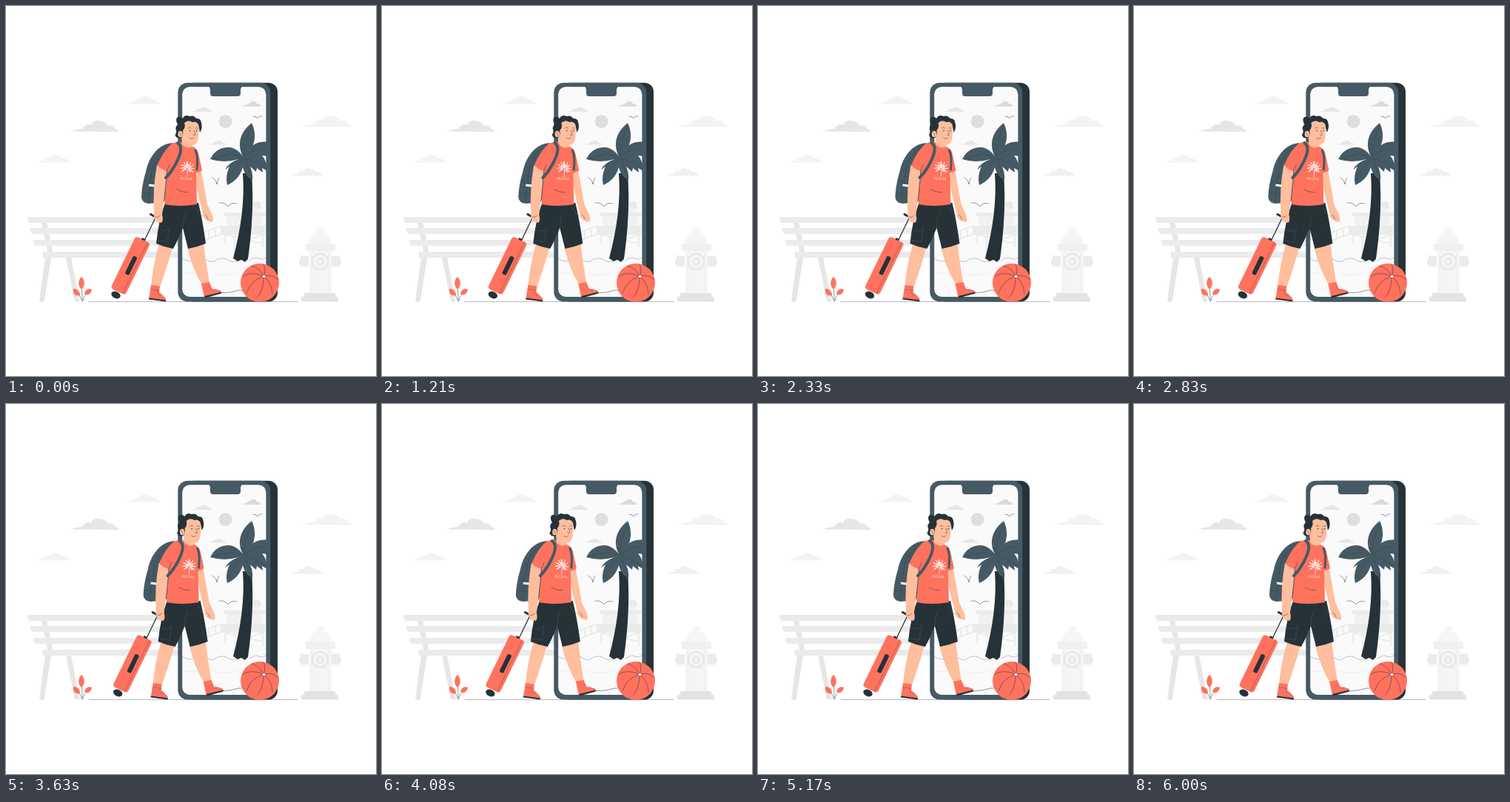
These frames come from a looping animation (500 px wide and 500 px high, 6.04 s). An HTML page:

```html
<!DOCTYPE html>
<html lang="en">
<head>
<meta charset="utf-8">
<title>Traveller</title>
<style>
html, body { margin: 0; width: 100%; height: 100%; overflow: hidden; background: #fff; }
svg { display: block; width: 100vw; height: 100vh; }
.red { fill: #ff725e; }
.dark { fill: #263238; }
.slate { fill: #455a64; }
.skin { fill: #ffbe9d; }
.line, .vein { fill: none; stroke: #263238; stroke-linecap: round; stroke-linejoin: round; }
.line { stroke-width: .5; }
.vein { stroke-width: .4; opacity: .7; }
</style>
</head>
<body>
<svg viewBox="0 0 500 500">
  <defs>
    <path id="cloud" d="M0 15.5Q5 12 15 12Q18 5 26 7Q30 0 38 2Q46 2 49 8Q58 7 59 12Q64 13 64 16Z"/>
    <clipPath id="screen"><rect x="238" y="109" width="116" height="284" rx="11"/></clipPath>
  </defs>

  <g id="clouds"></g>

  <g id="bench" fill="#e6e6e6">
    <path d="M47 288L54 288L64 336L57 336Z"/>
    <path d="M53 340H61L51.500 399.500H45ZM81 340H88L99.500 399.500H93Z"/>
    <path fill="#ebebeb" d="M28 285H236V293H31ZM32 300H236V308H35ZM36 316H236V324H39ZM49 332H236V340H50Z"/>
  </g>

  <g id="hydrant" fill="#f5f5f5">
    <path d="M419 307V303Q419 300 424.500 300Q430 300 430 303V307Q439 312 440 321H409Q410 312 419 307Z"/>
    <rect x="405" y="321" width="40" height="10" rx="2" fill="#f0f0f0"/>
    <rect x="410" y="331" width="30" height="58"/>
    <path fill="#ebebeb" d="M409 338H399V335H398V354H399V352H409ZM440 338H450V335H451V354H450V352H440ZM396 342H398V349H396ZM451 342H453V349H451Z"/>
    <path fill="#e3e3e3" d="M403 388H445V393H449V399.500H399V393H403Z"/>
    <path d="M413 333V387M436 333V387" stroke="#ebebeb" stroke-width=".7"/>
    <circle cx="424.500" cy="345.500" r="11.500" fill="#e6e6e6"/>
    <circle cx="424.500" cy="345.500" r="9.500"/>
    <circle cx="424.500" cy="345.500" r="5" fill="#e3e3e3"/>
    <circle cx="424.500" cy="345.500" r="3"/>
  </g>

  <g id="plant">
    <path class="line" d="M103 399C103 386 102 378 102 374M103 398Q100 392 96 387M104 398Q105 391 111 386"/>
    <path class="red" d="M102 383C96 378 98 369 102 366C107 370 107 379 102 383ZM100 391C92 393 90 386 91 382C97 382 100 386 100 391ZM106 389C107 383 112 381 116 383C115 389 111 392 106 389Z"/>
  </g>

  <path class="line" opacity=".65" d="M112 399.600H394"/>

  <g id="phone">
    <rect class="dark" x="242" y="103.700" width="125" height="295.800" rx="12"/>
    <rect class="slate" x="232.300" y="103.700" width="125" height="295.800" rx="13"/>
    <rect x="238.200" y="109.200" width="113.200" height="283.800" rx="10" fill="#fafafa"/>
    <path class="slate" d="M272 108H321Q317 109 317 114V118Q317 122 313 122H280Q276 122 276 118V114Q276 109 272 108Z"/>
    <g clip-path="url(#screen)">
      <circle cx="296.500" cy="156" r="9" fill="#dedede"/>
      <g id="rays" stroke="#ededed" stroke-width=".5"></g>
      <g id="house" fill="none" stroke="#e8e8e8" stroke-width="1.500">
        <path fill="#ebebeb" stroke="none" d="M320 273L325 264H342L346 273ZM294 279H350V284H294ZM290 297H350V309H290Z"/>
        <path fill="#f1f1f1" stroke="none" d="M298 284H346V297H298ZM324 273H343V279H324Z"/>
        <path d="M296 309V322M309 309V338M347 309V326M296 309L347 321M347 309L309 322"/>
        <path d="M291 297L265 307M291 308L265 318M283 300V311M274 303V314"/>
      </g>
      <path class="vein" d="M238 341Q248 348 256 343Q264 337 271 343Q278 349 286 342Q294 339 301 344Q307 348 314 344M329 344Q336 338 342 341Q347 344 352 339"/>
      <path fill="none" stroke="#e3e3e3" stroke-width=".6" d="M240 362Q252 359 262 363M278 361Q296 367 315 359"/>
      <path class="line" d="M279 386Q296 389 307 386Q314 383 322 384"/>
      <path class="line" d="M334 149Q338 149 340 152Q342 148 346 149M279 232Q284 235 285 241Q286 234 288 232M288 266Q296 265 300 271Q304 265 312 267"/>
      <path class="dark" d="M320 226H332C335 266 332 307 327 342L323 346L318 343L313 345L307 341C317 303 323 264 320 226Z"/>
      <path class="slate" d="M320 203C313 190 314 172 332 158C339 172 337 188 327 200C330 187 341 182 355 184V203L346 202Q353 210 353 223L346 219L347 225L339 219L338 224L330 217Q334 226 333 235Q323 231 320 218Q315 235 299 242Q296 230 302 217L296 221Q301 212 314 207Q295 213 276 207Q284 190 303 191Q313 193 320 203Z"/>
      <path class="vein" d="M321 203Q323 182 331 165M321 205Q336 190 352 194M320 204Q301 197 282 206M320 206Q307 217 300 236M323 206Q340 210 350 219M322 207Q329 221 332 231"/>
    </g>
  </g>

  <g id="ball">
    <circle class="red" cx="343" cy="374" r="26"/>
    <path class="line" d="M348 365Q342 353 332 351M347 365Q332 358 320 365M347 366Q331 370 325 388M348 367Q348 383 340 393M349 366Q359 373 360 389M350 365Q360 362 368 370M349 364Q351 354 348 349"/>
    <ellipse cx="348.500" cy="365.500" rx="2.200" ry="1.800" fill="#fff" stroke="#263238" stroke-width=".3"/>
  </g>

  <g id="traveller">
    <g id="suitcase">
      <path d="M202 286L187 317" stroke="#263238" stroke-width="1.300"/>
      <path d="M195.500 281.500L201 284.500" stroke="#263238" stroke-width="3" stroke-linecap="round"/>
      <ellipse class="dark" cx="148.500" cy="390.500" rx="6.500" ry="4.500" transform="rotate(25 148.500 390.500)"/>
      <g transform="translate(168.700 350) rotate(26)">
        <rect class="red" x="-11" y="-38" width="22" height="78" rx="4"/>
        <path class="vein" d="M7-37V39"/>
        <rect class="dark" x="-2.300" y="-13" width="6" height="27" rx="2"/>
        <rect class="dark" x="-2.500" y="-40" width="5" height="2.500"/>
      </g>
    </g>

    <g id="backpack">
      <path class="slate" d="M225 185C206 186 193 204 189 224C185 237 183 250 183 259Q184 266 193 267Q204 267 214 264L225 225Z"/>
      <path class="vein" d="M220 190Q199 200 196 230L213 234M187 235Q197 243 212 239M186 252Q197 256 212 252M196 230L192 264M203 205L215 211"/>
      <path d="M193 242L201 243" stroke="#fff" stroke-width="3"/>
    </g>

    <path class="skin" d="M245 326L267 320Q270 347 275 375L265 377Q251 353 245 326Z"/>
    <path class="skin" d="M207 321L225 326Q218 352 208 380L196 379Q198 352 207 321Z"/>
    <path class="red" d="M264 375L275 373L278 382L289 384Q292 386 290 388L268 394Z"/>
    <path class="dark" d="M268 392L291 386.500V388.500L269 394.500Z"/>
    <path class="red" d="M196 377L208 378.500L207 387L215 394Q217 397 215 399L193 396Z"/>
    <path class="dark" d="M193 394.500L216 397.500V399.500L193 396.500Z"/>
    <path class="vein" d="M204 386L208 385M205 389L210 387M207 391L212 390M275 380L278 378M277 382L281 380M280 384L285 382M196 383L206 384"/>

    <path class="dark" d="M215 266H260Q266 291 270 321Q258 326 246 328L239 300Q233 315 226 328Q214 326 203 321Q206 290 215 266Z"/>
    <path fill="none" stroke="#4b5b63" stroke-width=".5" d="M239 300Q239 288 243 280M207 302Q215 307 221 300L218 319L205 317M256 272Q261 281 265 284"/>

    <path class="skin" d="M255 222L264 223Q268 245 272 268L279 283Q281 289 279 292L274 291Q266 288 266 281L264 272Q257 248 255 222Z"/>
    <path class="red" d="M224 186Q232 182 240 185L252 190Q258 192 260 199L265 222Q261 226 257 225L258 268Q235 272 214 268L218 224Q211 222 204 216Q213 195 224 186Z"/>
    <path class="skin" d="M204 215Q210 221 217 223Q215 248 213 265L211 282Q213 290 210 293L203 291Q199 286 200 280Q198 246 204 215Z"/>
    <path class="line" d="M217 224L221 214M231 248Q238 252 246 252M202 285Q205 287 208 283M269 282Q272 284 273 288"/>
    <path fill="none" stroke="#455a64" stroke-width="4" stroke-linecap="round" d="M232 185C240 190 235 203 229 214Q223 225 216 232"/>
    <path fill="none" stroke="#455a64" stroke-width="3" stroke-linecap="round" d="M256 195Q260 203 258 221"/>

    <g id="emblem" fill="none" stroke="#fff" stroke-linecap="round">
      <g id="fronds" stroke-width="1"></g>
      <path stroke-width=".7" d="M245 230Q246 220 244 211"/>
    </g>
    <text x="243.500" y="235" text-anchor="middle" fill="#ffe3de" font-family="Lato, sans-serif" font-size="5" transform="rotate(4 243 235)">ALOHA</text>

    <g id="head">
      <path class="skin" d="M237 170L238 187Q244 194 252 190V181Z"/>
      <path class="skin" d="M237 158Q247 152 260 156Q261 169 260 178Q259 188 250 188Q240 186 237 178Z"/>
      <path class="dark" d="M237 178Q230 180 228.500 174Q231 171 230 168Q228 164 232 160Q228 153 232 150Q237 149 238.500 152Q242 146 248 149Q254 147 257 152Q263 151 264 158Q266 165 262 171L260 160Q257 155 252 157Q246 153 241 158Q243 164 239 168Q240 174 237 178Z"/>
      <ellipse class="skin" cx="235.500" cy="173" rx="3.200" ry="4.300"/>
      <path class="line" d="M246 165Q248 163 250 165M256 165L259 165M254 168Q257 174 255 175L253 174M248 178Q251 181 254 178M234 171Q237 172 236 175"/>
      <circle class="dark" cx="248.500" cy="168.500" r=".8"/>
      <circle class="dark" cx="257.500" cy="168.500" r=".8"/>
    </g>
  </g>
</svg>
<script>
const NS = 'http://www.w3.org/2000/svg';
const byId = id => document.getElementById(id);

function add(parent, tag, attrs) {
  const node = document.createElementNS(NS, tag);
  for (const key in attrs) node.setAttribute(key, attrs[key]);
  parent.appendChild(node);
}

function cloud(parent, x, y, width, height, fill) {
  add(parent, 'use', {
    href: '#cloud', fill,
    transform: `translate(${x} ${y}) scale(${width / 64} ${height / 16})`
  });
}

const sky = byId('clouds');
cloud(sky, 89, 153, 63, 17, '#e6e6e6');
cloud(sky, 163, 121, 45, 11.5, '#f3f3f3');
cloud(sky, 41, 200, 45, 11.5, '#f3f3f3');
cloud(sky, 402, 147, 65, 16.5, '#f3f3f3');
cloud(sky, 385, 218, 43, 11.5, '#f0f0f0');

const rays = byId('rays');
cloud(rays.parentNode, 251, 136, 28, 7, '#e6e6e6');
cloud(rays.parentNode, 319, 128, 26, 8, '#dadada');
cloud(rays.parentNode, 274, 181, 24, 6.5, '#e6e6e6');
for (let i = 0; i < 12; i++) {
  add(rays, 'path', { d: 'M296.5 143V139', transform: `rotate(${i * 30} 296.5 156)` });
}

// Leaf lobes fan out on both sides of the stem.
for (let i = -4; i <= 4; i++) {
  add(byId('fronds'), 'path', { d: 'M245 216Q246 213 245 210', transform: `rotate(${i * 31} 245 219)` });
  add(byId('fronds'), 'path', { d: 'M245 218V214', transform: `rotate(${i * 31 + 15} 245 220)` });
}

// Sideways shake: evenly spaced stops over six seconds, then a short rest.
const LOOP = 6040, STEP = 600, REACH = 2 / 3;
const stops = [0, -1, 2, -4, 4, -4, 4, -4, 2, -1, 0];
const smooth = p => p * p * (3 - 2 * p);

function shake(time) {
  const position = Math.min(time / STEP, stops.length - 1);
  const i = Math.min(Math.floor(position), stops.length - 2);
  return REACH * (stops[i] + (stops[i + 1] - stops[i]) * smooth(position - i));
}

const traveller = byId('traveller');
function draw() {
  const x = shake(performance.now() % LOOP);
  traveller.setAttribute('transform', `translate(${x.toFixed(3)} 0)`);
  requestAnimationFrame(draw);
}
draw();
</script>
</body>
</html>
```
